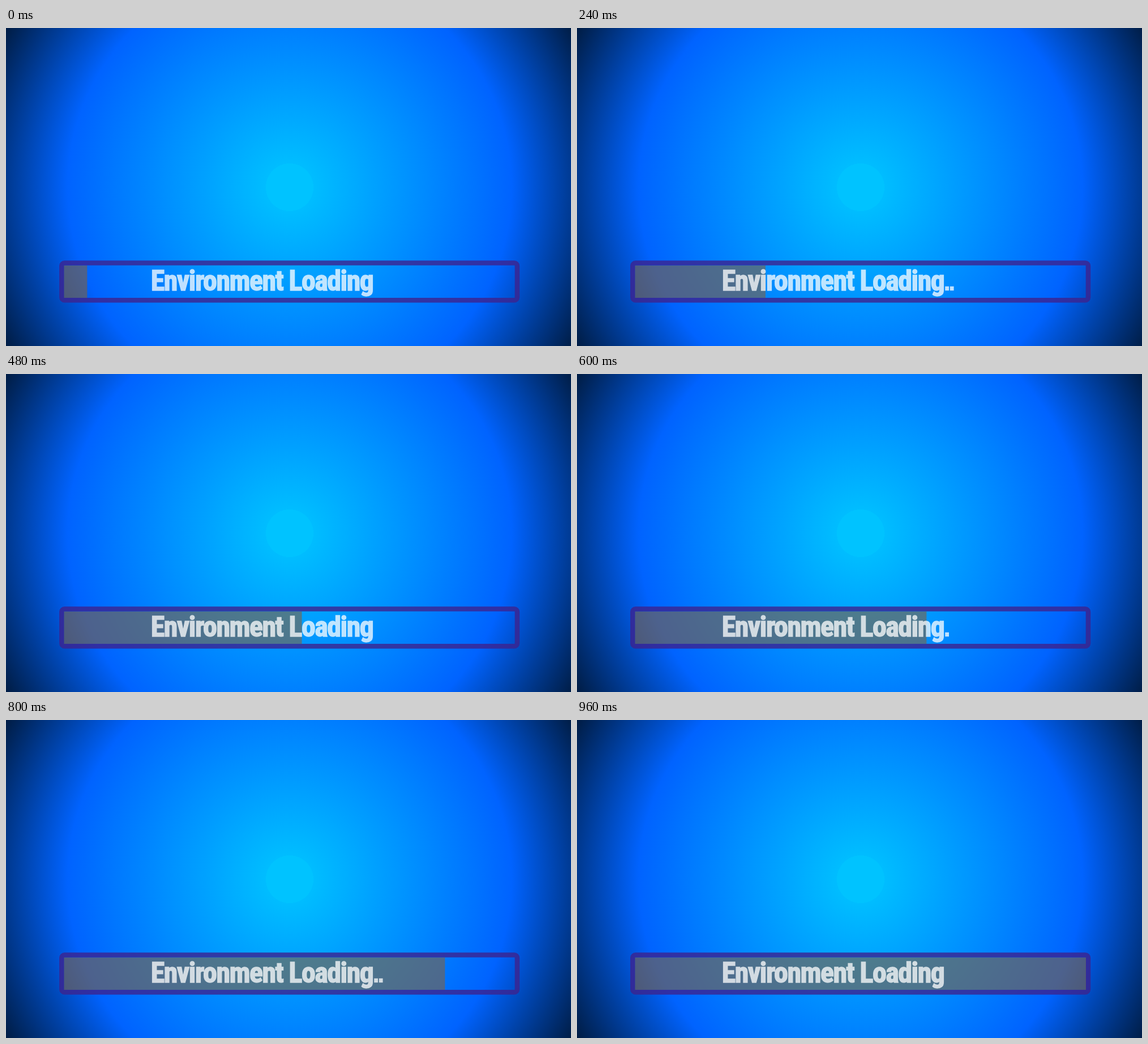
An HTML page with a canvas for the animation above (1 s loop, 998 by 561 pixels).

```html
<!DOCTYPE html>
<html lang="en">
<head>
<meta charset="utf-8">
<title>Environment Loading</title>
<style>
  html, body { margin: 0; width: 100%; height: 100%; overflow: hidden; background: #001a40; }
  canvas { display: block; }
</style>
</head>
<body>
<canvas id="stage" width="998" height="561"></canvas>
<script>
const W = 998, H = 561;
const STEP = 40, STEPS = 25;
const LABEL = "Environment Loading";
const LABEL_LEFT = 257, LABEL_WIDTH = 391, BASELINE = 462.5;
const OUTLINE = 1.4, TRACKING = -0.03;
const FAMILIES = ["Impact", "Roboto Condensed", "Noto Sans", "Open Sans", "Liberation Sans Narrow", "Roboto"];

const ctx = document.getElementById("stage").getContext("2d");

function makeLayer(paint) {
  const layer = document.createElement("canvas");
  layer.width = W;
  layer.height = H;
  paint(layer.getContext("2d"));
  return layer;
}

function paintBackdrop(g) {
  const core = 42, edge = 392, end = 580;
  const glow = g.createRadialGradient(501, 281, 0, 501, 281, end);
  const stop = (r, color) => glow.addColorStop(r / end, color);
  stop(0, "rgb(0,195,255)");
  stop(core, "rgb(0,195,255)");
  stop(core, "rgb(0,189,255)");
  stop(edge, "rgb(0,99,255)");
  stop(end, "rgb(0,26,62)");
  g.fillStyle = glow;
  g.fillRect(0, 0, W, H);
}

function paintFrame(g) {
  g.strokeStyle = "rgba(62,34,142,.8)";
  g.lineWidth = 8.5;
  g.beginPath();
  g.roundRect(98.3, 414.5, 804.7, 65.8, 5);
  g.stroke();
}

function inkOf(g, family, size) {
  g.font = `900 extra-condensed ${size}px "${family}", sans-serif`;
  g.letterSpacing = `${size * TRACKING}px`;
  const m = g.measureText(LABEL);
  return { left: m.actualBoundingBoxLeft, width: m.actualBoundingBoxLeft + m.actualBoundingBoxRight };
}

// The narrowest available face gives the tallest letters for the label's width.
function paintLabel(g) {
  const widthOf = family => inkOf(g, family, 100).width;
  const family = FAMILIES.reduce((a, b) => widthOf(b) < widthOf(a) ? b : a);
  const size = 100 * (LABEL_WIDTH - OUTLINE) / widthOf(family);
  const x = LABEL_LEFT + OUTLINE / 2 + inkOf(g, family, size).left;
  g.fillStyle = g.strokeStyle = "#fff";
  g.lineWidth = OUTLINE;
  g.miterLimit = 2;
  g.fillText(LABEL, x, BASELINE);
  g.strokeText(LABEL, x, BASELINE);
}

const backdrop = makeLayer(g => {
  paintBackdrop(g);
  paintFrame(g);
});
const label = makeLayer(paintLabel);

function draw(step) {
  ctx.drawImage(backdrop, 0, 0);

  const left = 102.5, right = Math.min(143.4 + 31.6 * step, 899);
  ctx.fillStyle = "rgba(128,98,66,.6)";
  ctx.fillRect(left, 419, right - left, 57);

  ctx.globalAlpha = 0.75;
  ctx.drawImage(label, 0, 0);
  ctx.fillStyle = "#fff";
  const dots = Math.floor(step / 3) % 4;
  for (let i = 0; i < dots; i++) ctx.fillRect(650.2 + 8.6 * i, 455.8, 6.8, 7.4);
  ctx.globalAlpha = 1;
}

const start = performance.now();
function tick() {
  draw(Math.floor((performance.now() - start) / STEP) % STEPS);
  requestAnimationFrame(tick);
}
tick();
</script>
</body>
</html>
```
